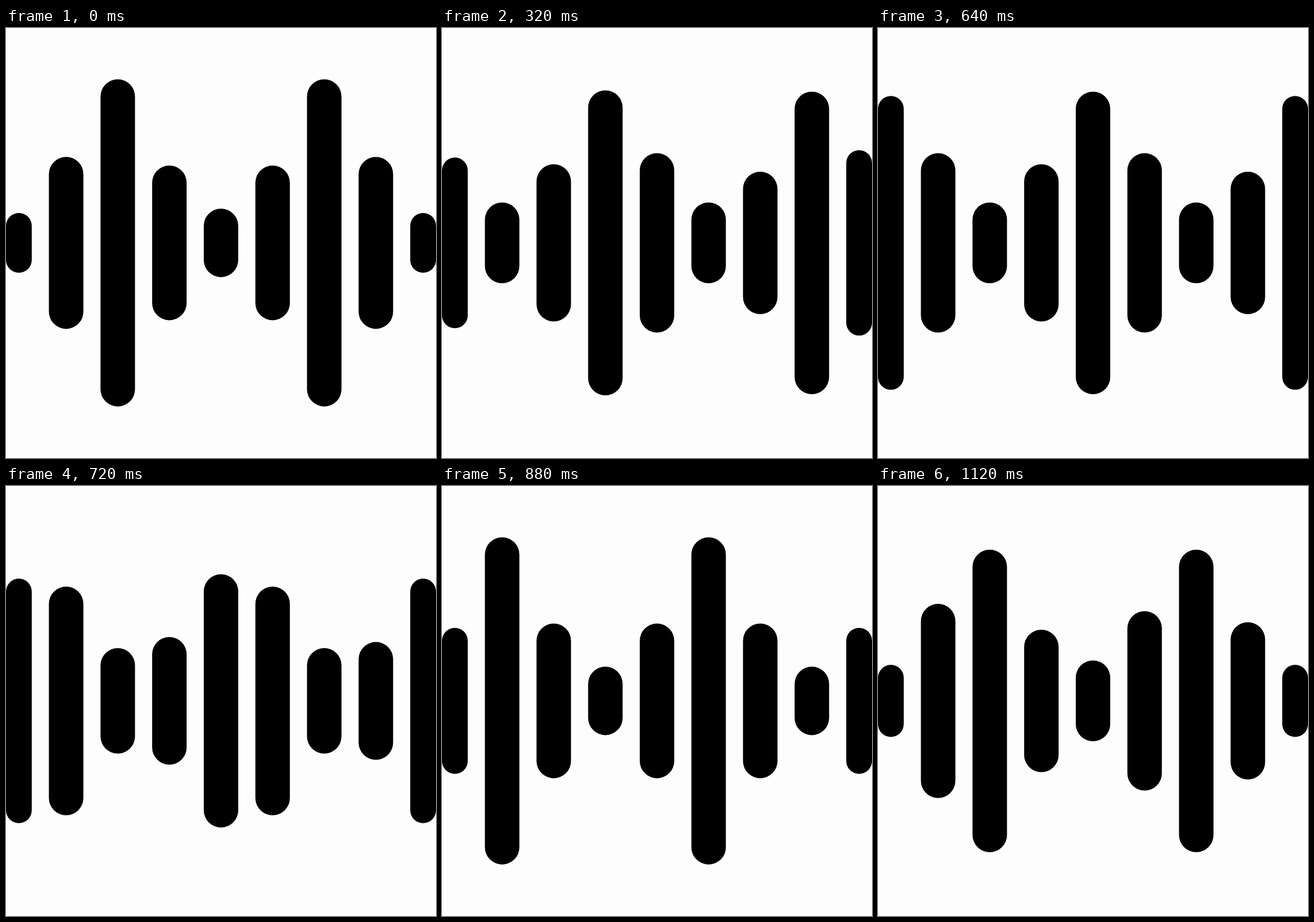
Recreate the animation shown at these times as an HTML page. Size 748x748 px, loop 1.2 s.

```html
<!DOCTYPE html>
<html lang="en">
<head>
<meta charset="utf-8">
<title>Sound wave</title>
<style>
  html, body { margin: 0; width: 100%; height: 100%; overflow: hidden; background: #fdfdfd; }
  svg { display: block; width: 100%; height: 100%; }
  #wave { stroke: #000; stroke-linecap: round; filter: blur(0.7px); }
</style>
</head>
<body>
<svg viewBox="0 0 748 748"><g id="wave"></g></svg>
<script>
const SIZE = 748, CENTER = 373.8, PITCH = 89.8, WIDTH = 60;
const BARS = 9, MIDDLE = 4, POSES = 4;
const STEP = 80, STEPS = 15;

const wave = document.getElementById("wave");

// Bars at the border are cut to the stage and keep round ends.
function makeBar(_, i) {
  const bar = document.createElementNS("http://www.w3.org/2000/svg", "line");
  const x = SIZE / 2 + (i - MIDDLE) * PITCH;
  const left = Math.max(0, x - WIDTH / 2);
  const right = Math.min(SIZE, x + WIDTH / 2);
  bar.setAttribute("x1", (left + right) / 2);
  bar.setAttribute("x2", (left + right) / 2);
  bar.setAttribute("stroke-width", right - left);
  wave.append(bar);
  return bar;
}

const bars = Array.from({ length: BARS }, makeBar);

// Half length of a bar without its caps: a crest every four bars moves
// right one bar per pose; the outer shoulders are slightly longer.
function reach(i, pose) {
  const side = i - MIDDLE;
  const distance = Math.abs(side - pose % POSES);
  const level = 2 - Math.abs(distance % 4 - 2);
  const shoulder = side && distance === 3 ? 15 : 0;
  return 30 + 75 * (2 ** level - 1) + shoulder;
}

// Two of seven ticks per step, with a brief slowdown after the first pose.
function phaseAt(step) {
  const lag = Math.min(1, Math.max(0, (step - 4) / 2));
  return (2 * step - lag) / 7;
}

function render(ms) {
  const phase = phaseAt(Math.floor(ms / STEP) % STEPS);
  const pose = Math.floor(phase), part = phase - pose;
  bars.forEach((bar, i) => {
    const half = reach(i, pose) * (1 - part) + reach(i, pose + 1) * part - 0.4;
    bar.setAttribute("y1", CENTER - half);
    bar.setAttribute("y2", CENTER + half);
  });
}

const start = performance.now();
function tick() {
  render(performance.now() - start);
  requestAnimationFrame(tick);
}
tick();
</script>
</body>
</html>
```
